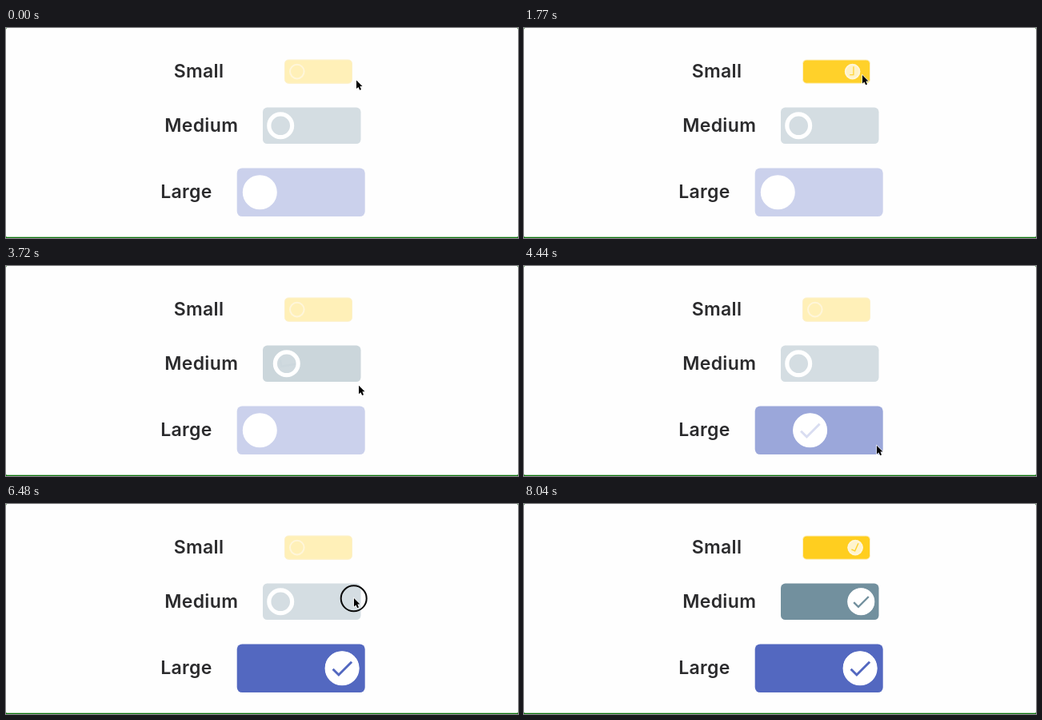
Write an HTML page that moves like this. It is 640 px wide and 263 px high and loops after 8.07 s.

```html
<!DOCTYPE html>
<html lang="en">
<head>
<meta charset="utf-8">
<title>Toggle sizes</title>
<style>
  html, body { margin: 0; width: 100%; height: 100%; overflow: hidden; background: #fefefe; }
  svg { display: block; width: 640px; height: 263px; }
  text { font: 600 23px Inter, Roboto, sans-serif; letter-spacing: 0.35px; fill: #2b2b2d; text-anchor: middle; }
</style>
</head>
<body>
<svg id="stage" viewBox="0 0 640 263">
  <rect width="640" height="263" fill="#0b750b"/>
  <rect width="640" height="261.7" rx="1.5" fill="#fefefe"/>
</svg>
<script>
const LOOP = 8070;
const SLIDE = 400;   // thumb travel time
const HOLD = 160;    // how long the pointer stays pressed before a flip
const REST = 130;    // pause after a flip before the pointer moves on
const SETTLE = 220;  // pointer arrives this long before the next flip

const small = {
  label: 'Small', labelX: 241, scale: 1, right: 433, cy: 54.6, r: 9.8, ring: 2,
  color: 'rgb(255,205,22)', white: '#fff6da', edge: 1, spin: 360
};
const medium = {
  label: 'Medium', labelX: 244.2, scale: 1.5, right: 443.5, cy: 122.3, r: 17, ring: 5.2,
  color: 'rgb(114,144,158)', white: '#fff', edge: 0, spin: 360
};
const large = {
  label: 'Large', labelX: 225.5, scale: 2, right: 448.7, cy: 205.7, r: 21.5, ring: 21.5,
  color: 'rgb(83,104,192)', white: '#fff', edge: 0, spin: 0
};
const toggles = [small, medium, large];

// The pointer's stops; each one flips its toggle at the given time.
const stops = [
  { at: -100, x: 438, y: 65.5 },
  { at: 870, toggle: small, x: 424, y: 56 },
  { at: 1724, toggle: small, x: 423, y: 59 },
  { at: 2710, toggle: medium, x: 441, y: 138 },
  { at: 3470, toggle: medium, x: 441, y: 138 },
  { at: 4344, toggle: large, x: 441, y: 225 },
  { at: 5242, toggle: large, x: 444, y: 222 },
  { at: 5990, toggle: large, x: 437, y: 215 },
  { at: 6630, toggle: medium, x: 435, y: 118 },
  { at: 7760, toggle: small, x: 425, y: 59 },
  { at: 8230, x: 655, y: 66 }
];

const stage = document.getElementById('stage');

function set(node, attrs) {
  for (const key in attrs) node.setAttribute(key, attrs[key]);
}

function add(parent, tag, attrs = {}) {
  const node = document.createElementNS('http://www.w3.org/2000/svg', tag);
  set(node, attrs);
  return parent.appendChild(node);
}

const mix = (a, b, p) => a + (b - a) * p;
const clamp = v => Math.min(1, Math.max(0, v));
const smooth = p => p * p * (3 - 2 * p);
const bezier = (a, b, s) => 3 * a * s * (1 - s) ** 2 + 3 * b * s * s * (1 - s) + s ** 3;

// CSS "ease" curve
function ease(x) {
  if (x <= 0 || x >= 1) return clamp(x);
  let low = 0, high = 1;
  for (let i = 0; i < 24; i++) {
    const mid = (low + high) / 2;
    if (bezier(0.25, 0.25, mid) < x) low = mid; else high = mid;
  }
  return bezier(0.1, 1, low);
}

function buildToggle(item) {
  const { scale, right, cy, r, ring, color, white, edge } = item;
  const width = 10 + 75 * scale;
  const height = 30.3 * scale;
  const inset = 3 + 12.8 * scale;
  item.from = right - width + inset;
  item.to = right - inset;
  add(stage, 'text', { x: item.labelX, y: cy + 7.5 }).textContent = item.label;
  item.track = add(stage, 'rect', {
    x: right - width + edge / 2, y: cy - height / 2 + edge / 2,
    width: width - edge, height: height - edge, rx: 3 + 1.7 * scale, fill: color
  });
  if (edge) {
    const border = item.track.cloneNode();
    set(border, { fill: 'none', stroke: '#fdf0c8', 'stroke-width': edge });
    stage.appendChild(border);
  }
  item.thumb = add(stage, 'g');
  item.face = add(item.thumb, 'circle', { r: r - 0.3, fill: white });
  add(item.thumb, 'circle', { r: r - ring / 2, fill: 'none', stroke: white, 'stroke-width': ring });
  item.tick = add(item.thumb, 'path', {
    d: 'M-11.5 1L-4.2 8.3L12 -8', fill: 'none', stroke: color, 'stroke-width': 3
  });
}

toggles.forEach(buildToggle);
const halo = add(stage, 'circle', { r: 16, fill: 'none', stroke: '#0a0a0a', 'stroke-width': 2 });
const pointer = add(stage, 'path', {
  d: 'M0 0V10.6L2.4 8.4L4.2 12.3L6 11.5L4.4 7.6H7.5Z',
  fill: '#000', stroke: '#fff', 'stroke-width': 1.2, 'paint-order': 'stroke'
});

function progress(item, t) {
  const flips = stops.filter(s => s.toggle === item && s.at <= t);
  if (!flips.length) return 0;
  const p = ease((t - flips[flips.length - 1].at) / SLIDE);
  return flips.length % 2 ? p : 1 - p;
}

function drawToggle(item, t) {
  const p = progress(item, t);
  const tint = mix(0.3, 1, p);
  set(item.track, { 'fill-opacity': tint });
  set(item.thumb, { transform: `translate(${mix(item.from, item.to, p)} ${item.cy})` });
  set(item.face, { opacity: p });
  set(item.tick, {
    opacity: p * tint,
    transform: `rotate(${item.spin * (p - 1)}) scale(${item.r / 21.5})`
  });
}

function drawPointer(t) {
  const i = stops.findIndex(s => s.at > t);
  const prev = stops[i - 1], next = stops[i];
  const leave = prev.at + REST;
  const p = smooth(clamp((t - leave) / (next.at - SETTLE - leave)));
  const x = mix(prev.x, next.x, p), y = mix(prev.y, next.y, p);
  const pressed = next.toggle && t >= next.at - HOLD;
  set(pointer, { transform: `translate(${x} ${y})` });
  set(halo, { cx: x - 0.3, cy: y + 0.3, visibility: pressed ? 'visible' : 'hidden' });
}

function draw(t) {
  toggles.forEach(item => drawToggle(item, t));
  drawPointer(t);
}

const start = performance.now();
function frame() {
  draw((performance.now() - start) % LOOP);
  requestAnimationFrame(frame);
}
frame();
</script>
</body>
</html>
```
